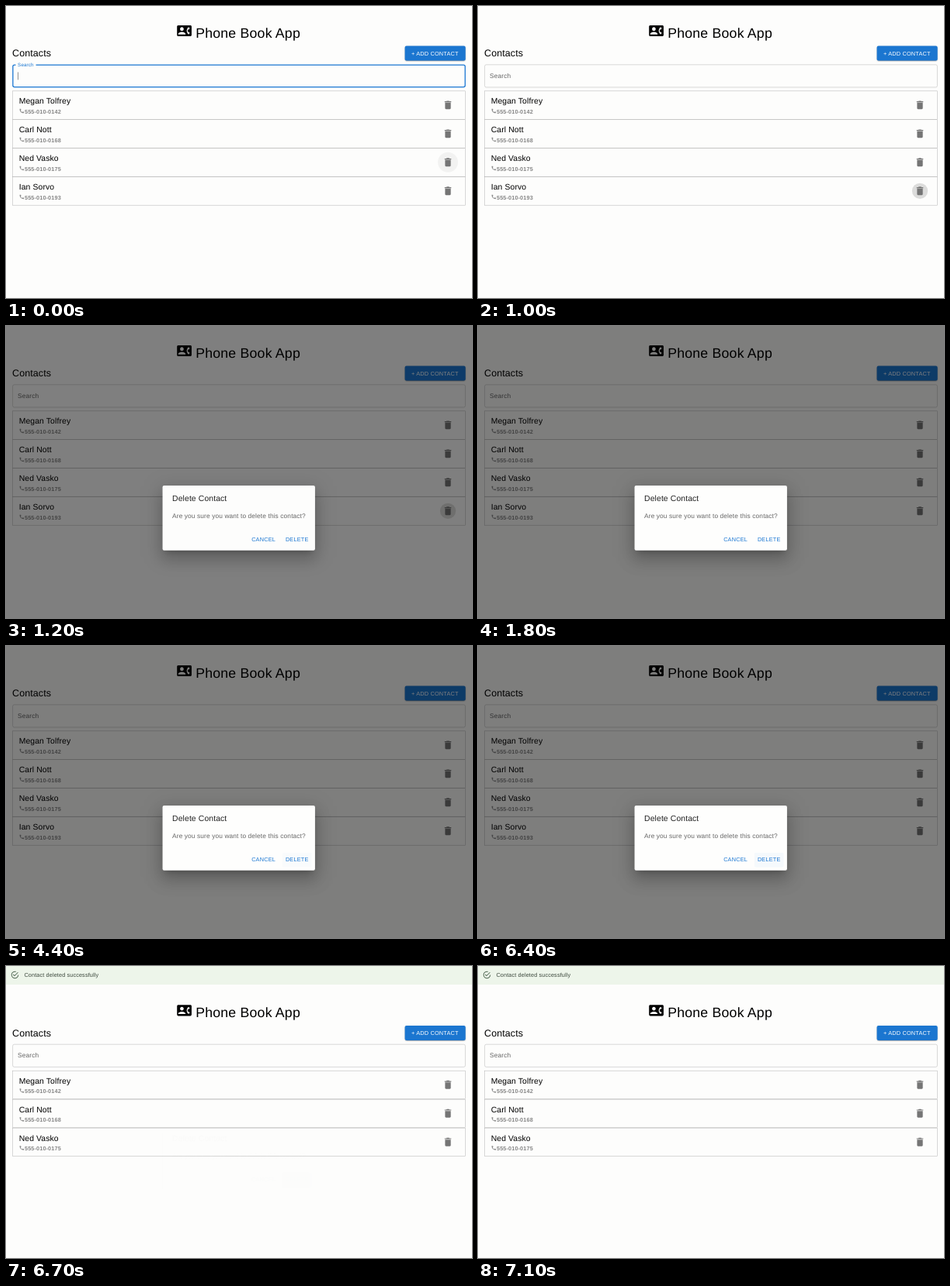
Recreate the animation shown at these times as an HTML page. Size 600 px wide and 377 px high, loop 8000 ms.

```html
<!DOCTYPE html>
<html lang="en">
<head>
<meta charset="utf-8">
<title>Phone Book App</title>
<style>
  html, body { margin: 0; width: 100%; height: 100%; overflow: hidden; background: #fdfdfc; }
  svg { display: block; width: 100%; height: 100%; }
  text { font-family: "Liberation Sans", Arial, sans-serif; text-rendering: geometricPrecision; white-space: pre; }
  .h4 { font-size: 34px; letter-spacing: .0115em; }
  .h5 { font-size: 24px; letter-spacing: .006em; }
  .h6 { font-size: 20px; letter-spacing: .0095em; }
  .body { font-size: 16px; letter-spacing: .0145em; fill: #666; }
  .small { font-size: 14px; letter-spacing: .0165em; }
  .label { font-size: 12px; letter-spacing: .02em; fill: #1976d2; }
  .button { font-size: 14px; letter-spacing: .02857em; fill: #1976d2; }
  .phone { font-weight: bold; fill: #888; }
</style>
</head>
<body>
<svg id="stage" viewBox="0 0 1152 723.84" preserveAspectRatio="none" xmlns="http://www.w3.org/2000/svg"></svg>
<script>
const LOOP = 8000, STEP = 100;
const SHIFT = 48.8;               // height the notice adds above the page
const ROW_TOP = 210.3, ROW_H = 71;
const BIN_X = 1092.5;

const people = [
  ["Megan Tolfrey", "555-010-0142"],
  ["Carl Nott", "555-010-0168"],
  ["Ned Vasko", "555-010-0175"],
  ["Ian Sorvo", "555-010-0193"]
];

const icons = {
  book: "M22 3H2C.9 3 0 3.9 0 5v14c0 1.1.9 2 2 2h20c1.1 0 1.99-.9 1.99-2L24 5c0-1.1-.9-2-2-2zM8 6c1.66 0 3 1.34 3 3s-1.34 3-3 3-3-1.34-3-3 1.34-3 3-3zm6 12H2v-1c0-2 4-3.1 6-3.1s6 1.1 6 3.1v1zm3.85-4h1.64L21 16l-1.99 1.99c-1.31-.98-2.28-2.38-2.73-3.99-.18-.64-.28-1.31-.28-2s.1-1.36.28-2c.45-1.62 1.42-3.01 2.73-3.99L21 8l-1.51 2h-1.64c-.22.63-.35 1.3-.35 2s.13 1.37.35 2z",
  call: "M20 15.4c-1.2 0-2.4-.2-3.5-.6-.4-.1-.7 0-1 .3l-1.6 1.9c-2.8-1.3-5.5-3.9-6.9-6.8l2-1.7c.2-.2.3-.6.2-1-.4-1.1-.6-2.3-.6-3.5 0-.5-.4-1-1-1H4.2C3.6 3 3 3.2 3 4c0 9.3 7.7 17 17 17 .7 0 1-.6 1-1.2v-3.4c0-.6-.4-1-1-1z",
  bin: "M6 19c0 1.1.9 2 2 2h8c1.1 0 2-.9 2-2V7H6v12zM19 4h-3.5l-1-1h-5l-1 1H5v2h14V4z",
  done: "M20 12A8 8 0 1 1 14.2 4.31L15.77 2.74A10 10 0 1 0 22 12M7.91 10.08L6.5 11.5 11 16 21 6 19.59 4.58 11 13.17Z"
};

const icon = (name, x, y, size, fill) =>
  `<path d="${icons[name]}" fill="${fill}" transform="translate(${x} ${y}) scale(${size / 24})"/>`;

const text = (cls, x, y, str, attrs = "") =>
  `<text class="${cls}" x="${x}" y="${y}" ${attrs}>${str}</text>`;

const rect = (x, y, w, h, attrs) =>
  `<rect x="${x}" y="${y}" width="${w}" height="${h}" ${attrs}/>`;

// Each layer: vertical offset, blur, spread, opacity
const shadow = (x, y, w, h, layers) => layers.map(([dy, blur, s, a]) =>
  rect(x - s, y + dy - s, w + 2 * s, h + 2 * s,
    `rx="4" fill-opacity="${a}" style="filter:blur(${blur / 2}px)"`)).join("");

const row = ([name, phone], i) => `<g id="row${i}" transform="translate(0 ${ROW_TOP + i * ROW_H})">
  ${rect(16.5, .5, 1119, ROW_H - 1, 'fill="none" stroke="#b4b4b4"')}
  ${text("h6", 32, 32.3, name)}
  ${icon("call", 32, 43, 14, "#888")}
  ${text("small phone", 46, 56, phone)}
  <circle id="halo${i}" cx="${BIN_X}" cy="35.2"/>
  ${icon("bin", BIN_X - 14, 21.2, 28, "#757575")}
</g>`;

const stage = document.getElementById("stage");
stage.innerHTML = `
<defs><clipPath id="deleteClip">${rect(683, 512, 73, 36.5, 'rx="4"')}</clipPath></defs>
${rect(0, 0, 1152, 724, 'fill="#fdfdfc"')}
<g id="notice">
  ${rect(0, -2, 1152, 48, 'fill="#edf5ea"')}
  ${icon("done", 11, 11, 22, "#4f6652")}
  ${text("small", 45, 26, "Contact deleted successfully", 'fill="#3a463b"')}
</g>
<g id="page">
  ${icon("book", 422.8, 43.4, 36, "#000")}
  ${text("h4", 468.8, 78.4, "Phone Book App")}
  ${text("h5", 15.5, 125, "Contacts")}
  ${shadow(986, 99, 150, 36.5, [[3, 1, -2, .2], [2, 2, 0, .14], [1, 5, 0, .12]])}
  ${rect(986, 99, 150, 36.5, 'rx="4" fill="#1b76d0"')}
  ${text("button", 1002, 122.1, "+ ADD CONTACT", 'style="fill:#fff"')}
  <g id="idle">
    ${rect(16.5, 145.5, 1119, 56, 'rx="4" fill="none" stroke="#b5b5b5"')}
    ${text("body", 29, 178.5, "Search")}
  </g>
  <g id="focused">
    ${rect(17, 146, 1118, 55, 'rx="4" fill="none" stroke="#1976d2" stroke-width="2.5"')}
    ${rect(24, 143, 50, 6, 'fill="#fdfdfc"')}
    ${text("label", 29, 149.8, "Search")}
    ${rect(29, 164, 1, 19, 'id="caret" fill="#333"')}
  </g>
  ${people.map(row).join("")}
</g>
${rect(0, 0, 1152, 724, 'id="shade"')}
<g id="dialog">
  ${shadow(387, 395.5, 377, 161, [[11, 15, -7, .2], [24, 38, 3, .14], [9, 46, 8, .12]])}
  ${rect(387, 395.5, 377, 161, 'rx="4" fill="#fefefd"')}
  ${text("h6", 411, 434.4, "Delete Contact", 'fill="#212121"')}
  ${text("body", 411, 477, "Are you sure you want to delete this contact?")}
  ${text("button", 607, 534.7, "CANCEL")}
  <g clip-path="url(#deleteClip)" fill="#1976d2">
    ${rect(683, 512, 73, 36.5, 'id="hover"')}
    <circle id="ripple" cx="714" cy="530" fill-opacity=".26"/>
  </g>
  ${text("button", 691, 534.7, "DELETE")}
</g>`;

const $ = id => document.getElementById(id);
const set = (id, attrs) => {
  for (const key in attrs) $(id).setAttribute(key, attrs[key]);
};
const show = (id, on) => set(id, { display: on ? "inline" : "none" });
const clamp = v => Math.min(1, Math.max(0, v));

// cubic-bezier(.4, 0, .2, 1)
function ease(x) {
  x = clamp(x);
  let lo = 0, hi = 1;
  for (let i = 0; i < 24; i++) {
    const u = (lo + hi) / 2, v = 1 - u;
    if (1.2 * v * v * u + .6 * v * u * u + u * u * u < x) lo = u; else hi = u;
  }
  return lo * lo * (3 - 2 * lo);
}

function draw(time) {
  const t = Math.floor(time / STEP) * STEP;
  const deleted = t >= 6600;
  const open = ease((t - 996) / 225) - ease((t - 6518) / 195);

  show("focused", t < 900);
  show("idle", t >= 900);
  show("caret", t < 600);
  show("notice", deleted);
  show("row3", !deleted);
  set("page", { transform: `translate(0 ${deleted ? SHIFT : 0})` });

  set("halo2", { r: 25, "fill-opacity": t < 900 ? .045 : 0 });
  set("halo3", {
    r: t < 1000 ? 25 : 19.5,
    "fill-opacity": t < 900 || t >= 1800 ? 0 : t < 1000 ? .06 : .13
  });

  set("shade", { "fill-opacity": open * .5 });
  set("dialog", { opacity: open });
  set("hover", { "fill-opacity": clamp((t - 4300) / 200) * .04 });
  set("ripple", { r: 38 * clamp((t - 6400) / 200) });
}

const start = performance.now();
function tick() {
  draw((performance.now() - start) % LOOP);
  requestAnimationFrame(tick);
}
tick();
</script>
</body>
</html>
```
